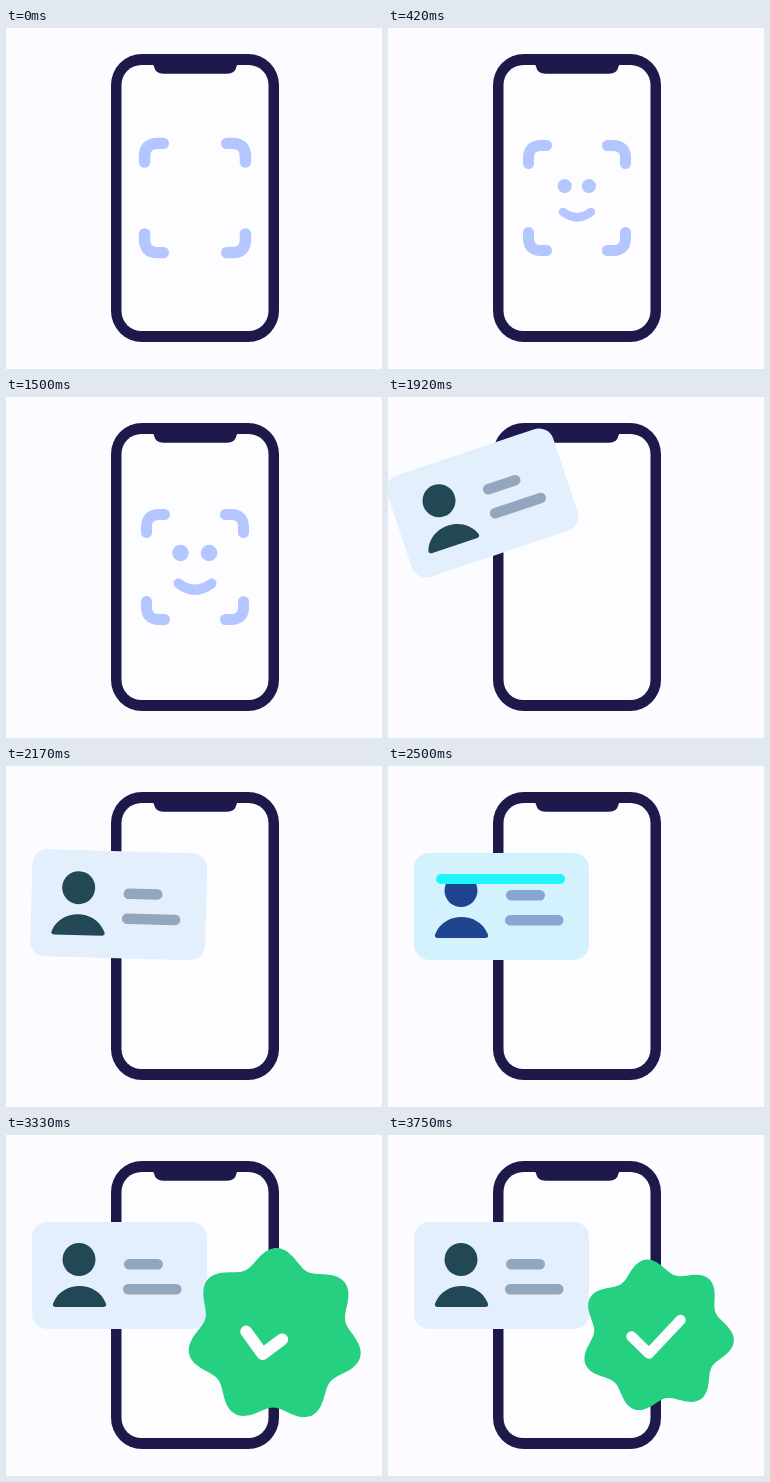
An HTML page with a canvas for the animation above (3830 ms loop, 376x341 px).

```html
<!DOCTYPE html>
<html lang="en">
<head>
<meta charset="utf-8">
<title>Identity check</title>
<style>
  html, body { margin: 0; width: 100%; height: 100%; overflow: hidden; background: #fcfbff; }
  canvas { display: block; width: 376px; height: 341px; }
</style>
</head>
<body>
<canvas id="stage" width="376" height="341"></canvas>
<script>
const ctx = document.getElementById('stage').getContext('2d');
const LOOP = 3830;
const STEP = LOOP / 46;
const NAVY = '#1d194b';
const CYAN = '#1ff6fc';

const clamp = v => Math.min(1, Math.max(0, v));
const mix = (a, b, p) => a + (b - a) * p;
const smooth = p => p * p * (3 - 2 * p);
const ramp = (t, from, to) => clamp((t - from) / (to - from));
const ease = (t, from, to) => smooth(ramp(t, from, to));
const blend = (a, b, p) => `rgb(${a.map((v, i) => Math.round(mix(v, b[i], p)))})`;

// Eased interpolation through rows of [time, value, value, ...].
function track(rows, t) {
  if (t <= rows[0][0]) return rows[0].slice(1);
  for (let i = 1; i < rows.length; i++) {
    const a = rows[i - 1], b = rows[i];
    if (t <= b[0]) {
      const p = ease(t, a[0], b[0]);
      return a.slice(1).map((v, k) => mix(v, b[k + 1], p));
    }
  }
  return rows[rows.length - 1].slice(1);
}

function box(x, y, w, h, r, color) {
  ctx.fillStyle = color;
  ctx.beginPath();
  ctx.roundRect(x, y, w, h, r);
  ctx.fill();
}

function disc(x, y, r, color) {
  ctx.fillStyle = color;
  ctx.beginPath();
  ctx.arc(x, y, r, 0, Math.PI * 2);
  ctx.fill();
}

function line(width, color) {
  ctx.lineWidth = width;
  ctx.strokeStyle = color;
  ctx.lineCap = ctx.lineJoin = 'round';
  ctx.stroke();
}

function place(x, y, scale, degrees, draw, alpha = 1) {
  if (scale <= 0 || alpha <= 0) return;
  ctx.save();
  ctx.globalAlpha = alpha;
  ctx.translate(x, y);
  ctx.rotate(degrees * Math.PI / 180);
  ctx.scale(scale, scale);
  draw();
  ctx.restore();
}

function phone() {
  box(105, 26, 168, 288, 31, NAVY);
  box(115.5, 37, 147, 266, 20, '#fdfdff');
  ctx.fillStyle = NAVY;
  ctx.beginPath();
  ctx.moveTo(146, 36);
  ctx.quadraticCurveTo(148, 37, 148, 38.5);
  ctx.quadraticCurveTo(149.5, 45.8, 157.5, 45.8);
  ctx.lineTo(221, 45.8);
  ctx.quadraticCurveTo(229, 45.8, 230.5, 38.5);
  ctx.quadraticCurveTo(230.5, 37, 232.5, 36);
  ctx.fill();
}

function brackets(color) {
  for (const sx of [-1, 1]) for (const sy of [-1, 1]) {
    ctx.beginPath();
    ctx.moveTo(sx * 48.5, sy * 34.5);
    ctx.lineTo(sx * 48.5, sy * 40);
    ctx.quadraticCurveTo(sx * 48.5, sy * 52.5, sx * 36, sy * 52.5);
    ctx.lineTo(sx * 30.5, sy * 52.5);
    line(11, color);
  }
}

function face(color) {
  disc(-14.5, -14, 8.3, color);
  disc(14, -14, 8.3, color);
  ctx.beginPath();
  ctx.moveTo(-16.5, 16.5);
  ctx.quadraticCurveTo(0, 29, 16.5, 16.5);
  line(10, color);
}

function faceScene(t) {
  if (t > 1830) return;
  const scan = ramp(t, 580, 680) * (1 - ramp(t, 1200, 1300));
  const color = blend([180, 198, 255], [178, 191, 229], scan);
  const out = ease(t, 1600, 1810);
  const frameScale = mix(1.04, 1, ease(t, 80, 420)) * mix(1, 0.8, out);
  const faceScale = ease(t, 160, 500) * mix(1, 0.8, out);

  place(189, 170, 1, 0, () => box(-49, -53, 99, 107, 7, '#dcfdff'), scan);
  place(189, 170, frameScale, 0, () => brackets(color), 1 - out);
  place(189, 170, faceScale, 0, () => face(color), 1 - out);
  const barY = mix(120, 221, ease(t, 605, 1175));
  place(189, barY, 1, 0, () => box(-48.5, -5, 97.5, 10, 5, CYAN), scan);
}

function card(scan) {
  const ink = blend([33, 72, 84], [31, 69, 145], scan);
  const bar = blend([146, 166, 189], [137, 165, 211], scan);
  box(-87.5, -53.5, 175, 107, 15, blend([228, 239, 254], [211, 242, 254], scan));
  disc(-40.5, -16, 16.5, ink);
  ctx.fillStyle = ink;
  ctx.beginPath();
  ctx.moveTo(-64, 31.5);
  ctx.quadraticCurveTo(-68, 31, -66, 27);
  ctx.bezierCurveTo(-57, 5, -23, 5, -14, 27);
  ctx.quadraticCurveTo(-12, 31, -16, 31.5);
  ctx.fill();
  box(4.5, -16.5, 39, 10.5, 5.2, bar);
  box(3.5, 8.5, 58.5, 10.5, 5.2, bar);
}

function cardScene(t) {
  if (t < 1620) return;
  const [x, y, scale, turn] = track([
    [1620, 145, 160, 0, -70],
    [1750, 107, 117, 0.95, -50],
    [1835, 95, 99, 1, -38],
    [1915, 94.5, 106, 1, -18.5],
    [2080, 112, 137, 1, 3],
    [2250, 113.5, 140.5, 1, 0]
  ], t);
  const scan = ramp(t, 2330, 2420) * (1 - ramp(t, 3000, 3160));
  place(x, y, scale, turn, () => card(scan));
  const barY = Math.min(172, 113 + (t - 2498) * 0.1055);
  place(112.5, barY, 1, 0, () => box(-64.5, -5, 129, 10, 5, CYAN), scan);
}

function badge(check) {
  ctx.fillStyle = '#25d080';
  ctx.beginPath();
  for (let i = 0; i <= 280; i++) {
    const a = i / 280 * Math.PI * 2;
    const r = 70 + 7 * Math.cos(7 * a);
    ctx.lineTo(r * Math.cos(a), r * Math.sin(a));
  }
  ctx.fill();
  if (check <= 0) return;
  ctx.rotate(-4 * Math.PI / 180);
  ctx.beginPath();
  ctx.moveTo(-25.5, 0.7);
  ctx.lineTo(-8, 17.7);
  ctx.lineTo(23.5, -15.8);
  ctx.setLineDash([72 * check, 100]);
  line(10.5, '#fdfdff');
}

function badgeScene(t) {
  const [scale, turn] = track([
    [3080, 0, -86],
    [3330, 1.14, 14],
    [3500, 1.04, 6],
    [3670, 1, 4]
  ], t);
  place(269, 200.8, scale, turn, () => badge(ease(t, 3200, 3420)));
}

function draw(now) {
  const time = Math.max(0, now) % LOOP;
  const t = Math.floor((time + 1) / STEP) * STEP % LOOP;
  ctx.fillStyle = '#fcfbff';
  ctx.fillRect(0, 0, 376, 341);
  phone();
  faceScene(t);
  cardScene(t);
  badgeScene(t);
  requestAnimationFrame(draw);
}

draw(0);
</script>
</body>
</html>
```
